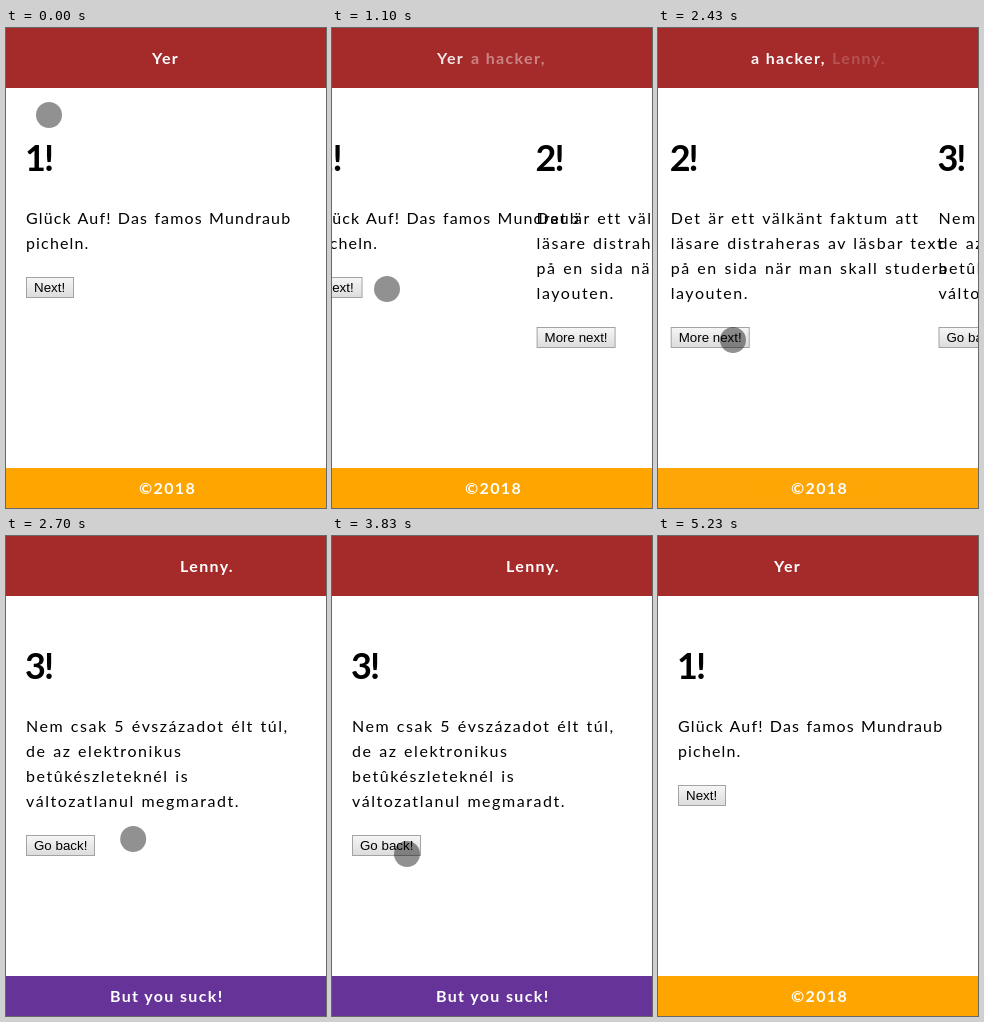
Recreate the animation shown at these times as an HTML page. Size 320 by 480 pixels, loop 5.91 s.

```html
<!DOCTYPE html>
<html lang="en">
<head>
<meta charset="utf-8">
<title>Page slides</title>
<style>
  html, body { margin: 0; width: 100%; height: 100%; overflow: hidden; background: #fff; }
  svg { display: block; width: 100%; height: 100%; }
  text { font-family: Lato, "Open Sans", sans-serif; }
  h1, .head { font-size: 36px; font-weight: 700; letter-spacing: -2px; }
  .body { font-size: 16px; letter-spacing: 1.55px; word-spacing: 1px; }
  .tight { letter-spacing: 1.15px; }
  .bar { font-size: 16px; font-weight: 700; letter-spacing: 1.35px; fill: #fff; }
  .label { font: 13.333px "Liberation Sans", Arial, sans-serif; }
</style>
</head>
<body>
<svg id="stage" viewBox="0 0 320 480"></svg>
<script>
const LOOP = 5910, SLIDE = 300, WIDTH = 320;

const pages = [
  { word: 'Yer', head: '1!', button: 'Next!', size: 48, style: 'body tight',
    lines: ['Glück Auf! Das famos Mundraub', 'picheln.'] },
  { word: 'a hacker,', head: '2!', button: 'More next!', size: 79, style: 'body',
    lines: ['Det är ett välkänt faktum att', 'läsare distraheras av läsbar text',
            'på en sida när man skall studera', 'layouten.'] },
  { word: 'Lenny.', head: '3!', button: 'Go back!', size: 69, style: 'body',
    lines: ['Nem csak 5 évszázadot élt túl,', 'de az elektronikus',
            'betûkészleteknél is', 'változatlanul megmaradt.'] }
];

// Each slide swaps two pages; the title holds both words side by side.
const slides = [
  { at: 1016, from: 0, to: 1, fromX: 105, toX: 139 },
  { at: 2396, from: 1, to: 2, fromX: 93, toX: 174 },
  { at: 3919, from: 2, to: 0, fromX: 150, toX: 116 }
];

// Pointer path: time, x, y
const path = [
  [0, 43, 87], [30, 43, 87], [200, 54, 128], [400, 69, 208], [610, 62, 251],
  [870, 55, 261], [1130, 55, 261], [1600, 70, 289], [1800, 76, 302],
  [2070, 75, 312], [2430, 75, 312], [2700, 127, 303], [2850, 152, 308],
  [3000, 162, 319], [3200, 154, 337], [3400, 130, 342], [3600, 106, 336],
  [3830, 75, 318], [3940, 75, 318], [4170, 130, 305], [4480, 165, 300],
  [4900, 165, 300], [5230, 115, 500], [LOOP, 115, 500]
];

const text = (style, x, y, s) => `<text class="${style}" x="${x}" y="${y}">${s}</text>`;

function pageMarkup(p) {
  const top = 199 + 25 * p.lines.length;
  return `<g class="page">${text('head', 19, 143, p.head)}
    ${p.lines.map((s, i) => text(p.style, 20, 196 + 25 * i, s)).join('')}
    <rect x="20.5" y="${top + .5}" width="${p.size - 1}" height="20" fill="url(#face)" stroke="#a3a3a3"/>
    ${text('label', 28, top + 15, p.button)}</g>`;
}

const footer = (id, color, x, s) =>
  `<g id="${id}"><rect y="440" width="320" height="40" fill="${color}"/>${text('bar', x, 466, s)}</g>`;

const stage = document.getElementById('stage');
stage.innerHTML = `
  <defs><linearGradient id="face" x2="0" y2="1">
    <stop stop-color="#f6f6f6"/><stop offset="1" stop-color="#dcdcdc"/>
  </linearGradient></defs>
  <rect width="320" height="480" fill="#fff"/>
  ${pages.map(pageMarkup).join('')}
  <rect width="320" height="60" fill="#a52a2a"/>
  ${pages.map(p => text('bar word', 0, 36, p.word)).join('')}
  ${footer('taunt', '#663399', 104, 'But you suck!')}
  ${footer('year', '#ffa500', 133, '©2018')}
  <circle id="pointer" r="13" fill="#000" fill-opacity=".43"/>`;

const panels = stage.querySelectorAll('.page');
const words = stage.querySelectorAll('.word');
const [taunt, year, pointer] = ['taunt', 'year', 'pointer'].map(id => document.getElementById(id));

// cubic-bezier(.42, 0, 1, 1)
function easeIn(t) {
  if (t <= 0 || t >= 1) return t <= 0 ? 0 : 1;
  let lo = 0, hi = 1, s;
  for (let i = 0; i < 24; i++) {
    s = (lo + hi) / 2;
    const x = 1.26 * s * (1 - s) ** 2 + 3 * s * s * (1 - s) + s ** 3;
    if (x < t) lo = s; else hi = s;
  }
  return s * s * (3 - 2 * s);
}
const easeOut = t => 1 - easeIn(1 - t);

// Smooth curve through the path points, at rest where a point repeats.
function slope(i, k) {
  const a = path[i - 1], b = path[i], c = path[i + 1];
  const same = (p, q) => p[1] === q[1] && p[2] === q[2];
  if (!a || !c || same(a, b) || same(b, c)) return 0;
  return (c[k] - a[k]) / (c[0] - a[0]);
}
function along(t, k) {
  let i = 0;
  while (i < path.length - 2 && t >= path[i + 1][0]) i++;
  const a = path[i], b = path[i + 1], d = b[0] - a[0], u = (t - a[0]) / d, v = 1 - u;
  return v * v * (1 + 2 * u) * a[k] + u * u * (3 - 2 * u) * b[k]
    + u * v * d * (v * slope(i, k) - u * slope(i + 1, k));
}

function show(i, offset, x, opacity) {
  panels[i].setAttribute('transform', `translate(${offset} 0)`);
  panels[i].setAttribute('visibility', Math.abs(offset) < WIDTH ? 'visible' : 'hidden');
  words[i].setAttribute('x', x);
  words[i].setAttribute('opacity', opacity);
}

function draw(t) {
  const slide = slides.filter(s => t >= s.at).pop();
  const seen = [0, 0, 0];
  pages.forEach((p, i) => show(i, WIDTH, 0, 0));
  if (slide) {
    const u = Math.min(1, (t - slide.at) / SLIDE);
    const enter = easeOut(u), leave = easeIn(u);
    show(slide.from, -WIDTH * leave, slide.fromX, 1 - leave);
    show(slide.to, WIDTH * (1 - enter), slide.toX, enter);
    seen[slide.from] = 1 - leave;
    seen[slide.to] = enter;
  } else {
    show(0, 0, 146, 1);
    seen[0] = 1;
  }
  // The first two pages share one footer.
  taunt.setAttribute('opacity', seen[2]);
  year.setAttribute('opacity', slide && slide.to === 1 ? 1 : Math.max(seen[0], seen[1]));
  pointer.setAttribute('cx', along(t, 1));
  pointer.setAttribute('cy', along(t, 2));
}

function tick() {
  draw(performance.now() % LOOP);
  requestAnimationFrame(tick);
}
tick();
</script>
</body>
</html>
```
